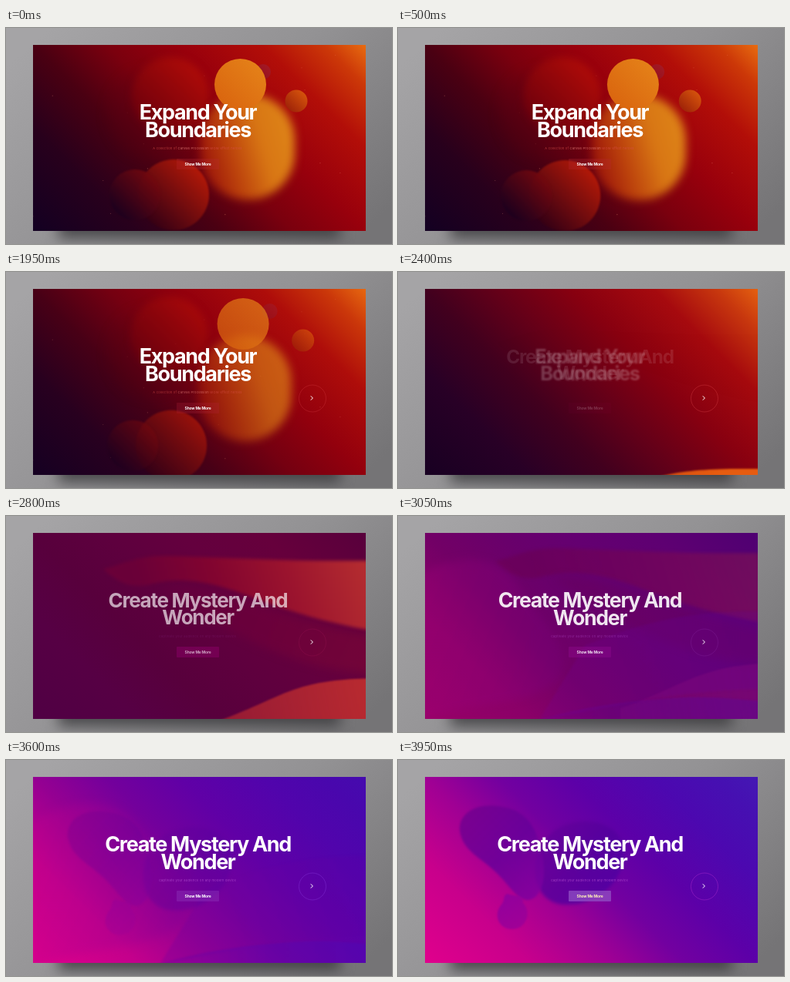
An HTML page with a canvas for the animation above (4000 ms loop, 500 by 281 pixels).

```html
<!DOCTYPE html>
<html lang="en">
<head>
<meta charset="utf-8">
<title>Hero slider</title>
<style>
html, body { margin: 0; width: 100%; height: 100%; overflow: hidden; background: #949496; }
canvas, svg { position: absolute; left: 0; top: 0; width: 500px; height: 281px; }
text { font-family: Inter, "Open Sans", sans-serif; text-anchor: middle; fill: #fff; }
.head { font-size: 27px; font-weight: 700; letter-spacing: -1.35px; }
.sub { font-size: 4px; letter-spacing: .25px; }
.cta { font-size: 5px; font-weight: 700; letter-spacing: -.2px; }
</style>
</head>
<body>
<canvas id="stage" width="500" height="281"></canvas>
<svg viewBox="0 0 500 281">
  <g id="first">
    <text class="head" x="248.5" y="119">Expand Your</text>
    <text class="head" x="248.5" y="142">Boundaries</text>
  </g>
  <g id="second">
    <text class="head" x="248.5" y="119">Create Mystery And</text>
    <text class="head" x="248.5" y="142">Wonder</text>
  </g>
  <text id="sub1" class="sub" x="248" y="158" style="fill:#d8504a">A collection of <tspan fill="#f08a80">Canvas Procession</tspan> WOW effect heroes</text>
  <text id="sub2" class="sub" x="248" y="158" style="fill:#b450d0">Captivate your audience on any modern device</text>
  <rect id="button" x="221" y="170" width="55" height="14" rx="1"/>
  <text id="cta" class="cta" x="248.5" y="179">Show Me More</text>
  <g id="next" fill="none">
    <circle id="ring" cx="397" cy="164.500" r="17.500" stroke-width=".7"/>
    <path d="M394.800 161.300 l2.600 2.700 -2.600 2.700" stroke="#fff" stroke-width="1"/>
  </g>
</svg>
<script>
const LOOP = 4000;
const CARD = { x: 35, y: 22, w: 431, h: 242 };
const ctx = document.getElementById('stage').getContext('2d');
const el = id => document.getElementById(id);
const rgb = hex => [1, 3, 5].map(i => parseInt(hex.slice(i, i + 2), 16));
const css = (c, a = 1) => `rgba(${c.map(v => v.toFixed(1)).join()},${a})`;

// Value of a list of [time, value] steps at time t; values are numbers or colours.
function track(t, steps) {
  if (t <= steps[0][0]) return steps[0][1];
  for (let i = 1; i < steps.length; i++) {
    const [t1, b] = steps[i], [t0, a] = steps[i - 1];
    if (t <= t1) {
      const k = (t - t0) / (t1 - t0);
      return Array.isArray(a) ? a.map((v, j) => v + (b[j] - v) * k) : a + (b - a) * k;
    }
  }
  return steps[steps.length - 1][1];
}

const STOPS = [0, .2, .36, .5, .64, .8, .92, 1];
const SKY = [
  [0, '#130022 #28001c #4a0012 #7a000e #98000c #b20e08 #cc3808 #e86c10'],
  [1750, '#130022 #28001c #4a0012 #7a000e #98000c #b20e08 #cc3808 #e86c10'],
  [2400, '#180022 #280026 #42001e #660018 #880010 #a60a0e #c8380e #e46010'],
  [2800, '#500044 #560044 #58003c #5e003e #64003e #66003c #5e003c #58003c'],
  [3300, '#e0008a #c0008c #8c0090 #740098 #6400a4 #5600a8 #4c00a8 #4600a8'],
  [3950, '#e0008c #c8008c #a00094 #7200a0 #5c00a8 #4c08b0 #4610b2 #4418b4']
].map(([t, list]) => [t, list.split(' ').map(rgb)]);
const SKY_TRACKS = STOPS.map((_, i) => SKY.map(([t, list]) => [t, list[i]]));

let seed = 7;
const rand = () => (seed = seed * 16807 % 2147483647) / 2147483647;
const dust = Array.from({ length: 24 }, () => [
  CARD.x + rand() * CARD.w, CARD.y + rand() * CARD.h, .15 + rand() * .3
]);

function shape(fill, blur, alpha, path) {
  ctx.save();
  ctx.globalAlpha *= alpha;
  if (blur) ctx.filter = `blur(${blur}px)`;
  ctx.fillStyle = fill;
  ctx.beginPath();
  path();
  ctx.fill();
  ctx.restore();
}

function ramp(x0, y0, x1, y1, ...colors) {
  const g = ctx.createLinearGradient(x0, y0, x1, y1);
  colors.forEach((c, i) => g.addColorStop(i / (colors.length - 1), c));
  return g;
}

// Ball lit from the upper right.
function ball(x, y, r, light, dark, blur = 0, alpha = 1) {
  const d = r * .7;
  shape(ramp(x + d, y - d, x - d, y + d, light, dark), blur, alpha,
    () => ctx.arc(x, y, r, 0, 7));
}

function curve(fill, blur, alpha, d, dx = 0, dy = 0) {
  ctx.save();
  ctx.translate(dx, dy);
  ctx.globalAlpha *= alpha;
  if (blur) ctx.filter = `blur(${blur}px)`;
  ctx.fillStyle = fill;
  ctx.fill(new Path2D(d));
  ctx.restore();
}

function drawWall() {
  ctx.fillStyle = ramp(90, -30, 400, 320, '#a5a4a6', '#939294', '#757476');
  ctx.fillRect(0, 0, 500, 281);
  shape('#38373a', 9, .8, () => ctx.rect(68, 236, 365, 38));
}

function drawSky(t) {
  const g = ctx.createLinearGradient(35, 264, 371.5, -72.5);
  STOPS.forEach((s, i) => g.addColorStop(s, css(track(t, SKY_TRACKS[i]))));
  ctx.fillStyle = g;
  ctx.fillRect(CARD.x, CARD.y, CARD.w, CARD.h);
}

function drawBalls(t) {
  const show = track(t, [[1800, 1], [2330, 0]]);
  if (!show) return;
  const s = t / 1350;
  const out = track(t, [[1700, 0], [2350, 1]]) ** 2;
  ctx.save();
  ctx.globalAlpha = show;
  for (const [x, y, a] of dust) shape('#ff9a80', 0, a, () => ctx.arc(x, y, .6, 0, 7));
  ctx.translate(0, -40 * out);
  ball(190, 112, 56, '#7c0010', '#4c0012', 8, .7);
  ball(213 - s, 88, 50, '#b00c08', '#70000c', 5, .9);
  shape(ramp(248, 170, 372, 135, '#98100a', '#bc420c', '#d87614', '#de8418'), 6, 1,
    () => ctx.roundRect(252 - s * 2, 86 + s * 2, 122 - s, 137, 60));
  ball(333 + s * 6, 57, 10, '#a01c2c', '#8c1426', 0, .75);
  ball(303.5 + s * 2.5, 73.500, 33.500, '#e48018', '#da660f');
  ball(376 + s * 6, 95, 14.500, '#d4520c', '#a02408');
  ctx.translate(0, 70 * out);
  ball(217 - s * 2, 217 + s * 3, 46, '#b01808', '#360014', .8);
  ball(167 - s * 2, 217 + s * 3, 33, '#74080e', '#1c001e', 1, .9);
  ctx.restore();
}

function drawWaves(t) {
  const red = track(t, [[2400, 0], [2800, 1], [3150, 0]]);
  const low = track(t, [[2340, 0], [2400, 1], [2850, 1], [3200, 0]]);
  const violet = track(t, [[2950, 0], [3300, 1], [3850, 0]]);
  const lift = track(t, [[2300, 56], [2400, 45], [2800, 0], [3300, -40]]);
  if (red) {
    curve(ramp(200, 80, 470, 200, '#64003e', '#70003a', '#7c0836'), 6, red * .6,
      'M200 92 C285 84 330 132 480 158 V206 C370 198 300 160 200 92 Z', 0, lift * .6);
    curve(ramp(460, 55, 190, 140, '#b42c30', '#9c142e', '#820430', '#6a0038'), 2, red,
      'M126 69 C150 64 165 52 205 52 C290 54 370 60 480 58 V150 C420 140 370 125 325 108 C270 86 230 78 190 88 C170 94 150 92 126 69 Z',
      0, lift * .5);
  }
  if (low) {
    const hot = track(t, [[2400, rgb('#e65c10')], [2800, rgb('#b82a30')], [3200, rgb('#8000a0')]]);
    curve(ramp(265, 260, 466, 215, css(hot, .6), css(hot)), .8, low,
      'M266 270 C318 252 350 232 385 222 C415 214 440 212 480 211 H560 V330 H266 Z', -lift * 1.1, lift);
  }
  if (violet) {
    const dx = (t - 3300) * .03;
    curve(ramp(35, 100, 230, 180, '#c0008e', '#a00090', '#780098'), 6, violet * .55,
      'M20 85 C70 50 130 45 160 85 C190 135 240 175 215 215 C170 250 90 240 20 275 Z', dx, 0);
    curve(ramp(270, 200, 466, 130, '#7000a0', '#6200a2', '#5800a6'), 1.5, violet * .65,
      'M250 168 C300 150 360 122 480 124 V225 C390 226 320 240 190 266 Z', dx, 0);
    curve(ramp(190, 264, 466, 236, '#7000a0', '#5206b4', '#480cba'), 1, violet * .85,
      'M188 266 C250 246 330 238 380 236 C420 235 450 239 480 241 V280 H188 Z', dx, 0);
  }
}

function drawHeart(t) {
  const a = track(t, [[3400, 0], [3900, 1]]);
  if (!a) return;
  const dy = track(t, [[3400, 12], [3950, 0]]);
  curve(ramp(175, 80, 295, 180, '#6a0098', '#54009c', '#4c00a4'), 2, a * .8,
    'M178 150 C175 105 205 80 242 80 C278 80 297 102 292 130 C286 164 255 190 215 188 C195 187 180 172 178 150 Z', 0, dy);
  curve(ramp(80, 70, 190, 180, '#70008e', '#64009a', '#8200a0'), 1.5, a * .8,
    'M80 92 C78 68 104 54 136 61 C170 67 181 92 187 125 C192 150 188 178 170 182 C156 184 146 165 128 147 C108 127 84 119 80 92 Z', 0, dy);
  curve(ramp(130, 175, 168, 220, '#8800a0', '#9c0098'), .8, a * .8,
    'M142 174 C152 178 163 174 162 186 C174 198 166 220 148 220 C130 220 123 201 134 188 C139 183 135 176 142 174 Z', 0, dy);
}

function place(id, alpha, scale = 1, blur = 0) {
  const node = el(id);
  node.style.opacity = alpha;
  node.style.filter = blur ? `blur(${blur}px)` : 'none';
  node.setAttribute('transform', `translate(248.5 122) scale(${scale}) translate(-248.5 -122)`);
}

const BUTTON = [[1800, rgb('#b82830')], [2800, rgb('#960070')], [3300, rgb('#8c18b0')],
  [3800, rgb('#9050c4')]];
const RING = [[2400, rgb('#e04850')], [2800, rgb('#b02060')], [3300, rgb('#5a30d8')],
  [3900, rgb('#a428c8')]];

function drawType(t) {
  place('first', track(t, [[2050, 1], [2400, .22], [2600, 0]]),
    track(t, [[2050, 1], [2400, .94], [2600, .9]]), track(t, [[2100, 0], [2400, 1.2]]));
  place('second', track(t, [[2300, 0], [2400, .1], [2800, .65], [3150, 1]]),
    track(t, [[2300, .88], [2400, .9], [2800, .963], [3000, .985], [3250, 1]]));
  place('sub1', track(t, [[1900, .75], [2300, 0]]));
  place('sub2', track(t, [[2800, .15], [3300, .8]]) * (t > 2600));
  place('cta', track(t, [[1950, 1], [2400, .2], [2800, .65], [3200, 1]]));
  el('cta').style.fill = css(track(t, [[3750, rgb('#ffffff')], [3950, rgb('#fff0b8')]]));
  el('button').setAttribute('fill', css(track(t, BUTTON),
    track(t, [[1900, .28], [2350, 0], [2800, .4], [3700, .4], [3900, .75]])));
  el('next').style.opacity = track(t, [[1050, 0], [1300, 1]]);
  el('ring').setAttribute('stroke', css(track(t, RING),
    track(t, [[1700, .35], [2400, .5], [2800, .3], [3300, .75]])));
}

function frame(now) {
  const t = now % LOOP;
  drawWall();
  ctx.save();
  ctx.beginPath();
  ctx.rect(CARD.x, CARD.y, CARD.w, CARD.h);
  ctx.clip();
  drawSky(t);
  drawBalls(t);
  drawWaves(t);
  drawHeart(t);
  ctx.restore();
  drawType(t);
}

const start = performance.now();
(function tick() {
  frame(performance.now() - start);
  requestAnimationFrame(tick);
})();
</script>
</body>
</html>
```
